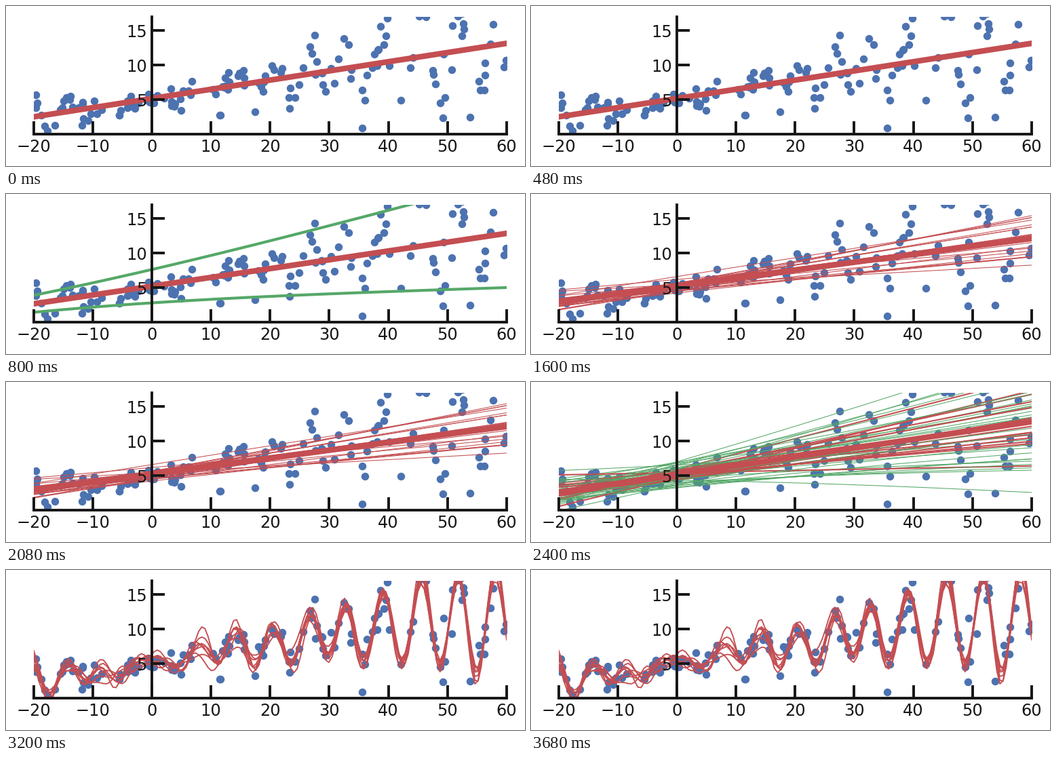
Recreate the animation shown at these times as a matplotlib script. Size 765 px wide and 236 px high, loop 4 s.

```python
import numpy as np
import matplotlib.pyplot as plt
from matplotlib.animation import FuncAnimation

W, H, DPI = 765, 236, 150
BLUE, RED, GREEN, INK = "#4C72B0", "#C44E52", "#55A868", "#161616"
X_MIN, X_MAX, Y_MAX = -20, 60, 17
LEFT, TOP, AX_W, AX_H = 40.5, 15.75, 697.5, 173.25

plt.rcParams.update({"font.family": "DejaVu Sans", "axes.axisbelow": False})
fig = plt.figure(figsize=(W / DPI, H / DPI), dpi=DPI, facecolor="white")
ax = fig.add_axes([LEFT / W, 1 - (TOP + AX_H) / H, AX_W / W, AX_H / H])
x = np.linspace(X_MIN, X_MAX, 150)


def style_axes():
    ax.set(xlim=(X_MIN, X_MAX), ylim=(0, Y_MAX))
    ax.set_xticks(range(X_MIN, X_MAX + 1, 10))
    ax.set_yticks([5, 10, 15])
    ax.tick_params(direction="in", length=9, width=1.875, pad=3.5,
                   color=INK, labelcolor=INK, labelsize=11.55)
    ax.spines[["top", "right"]].set_visible(False)
    ax.spines["left"].set_position(("data", 0))
    for side in ("left", "bottom"):
        ax.spines[side].set(linewidth=1.875, color=INK)


def wave(t, base=5.0, gain=0.125):
    return base + gain * t * (1 + np.sin(t))


def observations(n=150):
    """Noisy wave whose spread grows with x."""
    rng = np.random.RandomState(43)
    px = (X_MAX - X_MIN) * rng.rand(n) + X_MIN
    spread = 3 * (0.25 + ((px - X_MIN) / (X_MAX - X_MIN)) ** 2)
    eps = rng.randn(n) * spread
    return px, wave(px) + eps


def softplus(v):
    return np.log1p(np.exp(v))


def draw(y, color=RED, width=4.0):
    return ax.plot(x, y, color=color, lw=width)[0]


def band(mean, dev, width):
    return [draw(mean + k * dev, GREEN, width) for k in (2, -2)]


def random_lines(n, seed, bias, bias_sd, slope, slope_sd):
    """Lines whose average is exactly bias + slope * x."""
    z = np.random.RandomState(seed).randn(2, n, 1)
    z -= z.mean(axis=1, keepdims=True)
    z /= z.std(axis=1, keepdims=True)
    return bias + bias_sd * z[0] + (slope + slope_sd * z[1]) * x


def plain_fit():
    return [draw(5.16 + 0.133 * x)]


def fit_with_noise():
    mean = 5.2 + 0.1275 * x
    return [draw(mean)] + band(mean, softplus(0.85 + 0.0509 * x), 2)


def ensemble():
    ys = random_lines(25, 4, 5.2, 0.55, 0.1156, 0.03)
    return [draw(y, width=0.5) for y in ys] + [draw(ys.mean(axis=0))]


def noisy_ensemble():
    ys = random_lines(15, 8, 5.15, 0.5, 0.1275, 0.053)
    dev = softplus(-0.31 + 0.0345 * x)
    arts = []
    for y in ys:
        arts += [draw(y, width=1)] + band(y, dev, 0.5)
    return arts + [draw(ys.mean(axis=0))]


def wave_samples(px, py, n=8, amp=1.7, length=1.6, noise=1.5):
    """Gaussian process samples around the wave, given the observations."""
    def kernel(a, b):
        return amp ** 2 * np.exp(-((a[:, None] - b) / length) ** 2 / 2)

    def prior(t):
        return wave(t, 5.2, 0.13)

    cross = kernel(x, px)
    gain = np.linalg.solve(kernel(px, px) + noise ** 2 * np.eye(px.size),
                           cross.T).T
    mean = prior(x) + gain @ (py - prior(px))
    cov = kernel(x, x) - gain @ cross.T
    rng = np.random.RandomState(11)
    ys = rng.multivariate_normal(mean, cov, n, check_valid="ignore")
    return [draw(y, width=0.9) for y in ys]


style_axes()
points = observations()
ax.plot(*points, ".", color=BLUE, ms=9, mew=1)
scenes = [plain_fit(), fit_with_noise(), ensemble(), noisy_ensemble(),
          wave_samples(*points)]


def update(frame):
    for i, arts in enumerate(scenes):
        for art in arts:
            art.set_visible(i == frame)
    return sum(scenes, [])


anim = FuncAnimation(fig, update, frames=len(scenes), interval=800,
                     repeat=True, repeat_delay=0, blit=False)
plt.show()
```
